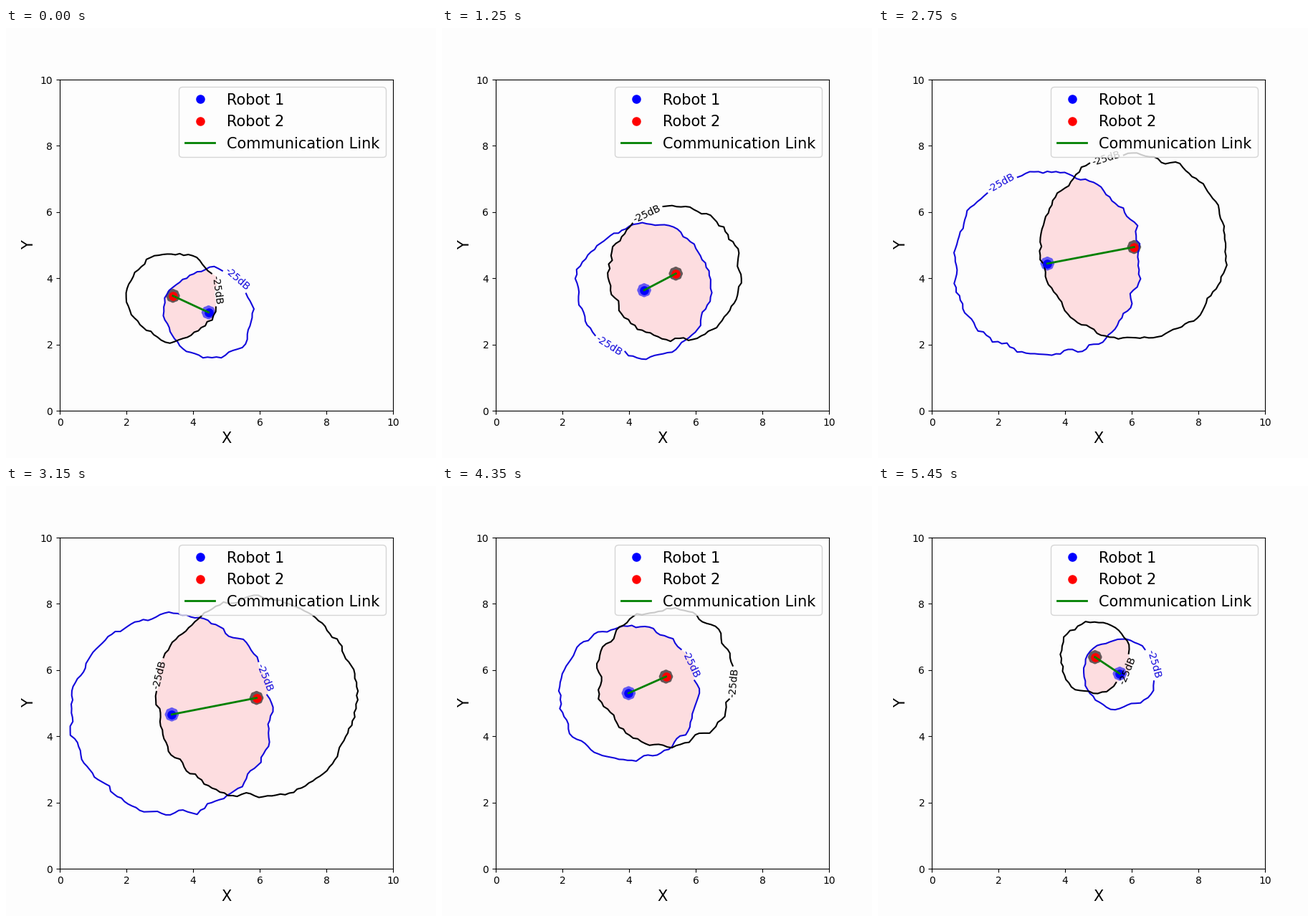
Recreate the animation shown at these times as a matplotlib script. Size 600 by 600 pixels, loop 5500 ms.

```python
import numpy as np
import matplotlib.pyplot as plt
from matplotlib.animation import FuncAnimation
from matplotlib.patches import Polygon
from matplotlib.path import Path

FRAMES, STEP = 110, 50
LAST = FRAMES - 1
PAPER = "#fdfdfd"
RING_COLORS = ("#1208dc", "black")
SPACING = 0.13      # distance between ring points
HALF_GAP = 0.51     # room for half a label


def positions(n):
    """Both robots climb steadily while they swing past each other."""
    s = n / LAST
    mid = (3.93 + 1.34 * s + 0.18 * np.sin(np.pi * s)
           + 0.57 * np.sin(2 * np.pi * s) + 0.027 * np.sin(4 * np.pi * s))
    apart = 0.51 + 2.1 * np.cos(0.0425 * (n - 57))
    y = 2.97 + 0.0268 * n
    return np.array([[mid - apart / 2, y], [mid + apart / 2, y + 0.5]])


def signal_range(n):
    """Grows at one rate, then shrinks faster."""
    return min(1.33 + 0.0265 * n, 1.07 + 0.0445 * (LAST - n))


def polar(center, radius, angle):
    return center + np.column_stack([radius * np.cos(angle), radius * np.sin(angle)])


def ring(center, radius, start, rng):
    """Closed noisy circle that begins at the angle start."""
    count = int(2 * np.pi * radius / SPACING)
    noise = rng.normal(size=count)
    noise = sum(np.roll(noise, k) for k in range(3)) / np.sqrt(3)
    angle = start + np.linspace(0, 2 * np.pi, count, endpoint=False)
    pts = polar(center, radius + 0.048 * (noise - noise.mean()), angle)
    return np.vstack([pts, pts[:1]])


def halo_shape(center):
    angle = np.linspace(0, 2 * np.pi, 100)
    return polar(center, 0.204 + 0.007 * np.cos(8 * angle), angle)


def blank_patch(color, **style):
    return ax.add_patch(Polygon(np.eye(3, 2), fc=color, ec="none", **style))


fig, ax = plt.subplots(figsize=(6, 6), dpi=100, facecolor=PAPER)
ax.set_facecolor(PAPER)
ax.set(xlim=(0, 10), ylim=(0, 10))
ax.set_xlabel("X", fontsize=15)
ax.set_ylabel("Y", fontsize=15)

overlap = blank_patch("#fddde0", zorder=0.5)
halos = [blank_patch(c, alpha=0.6, zorder=1.5) for c in ("blue", "black")]
dots = [ax.plot([], [], "o", color=c, ms=8, label=f"Robot {i + 1}")[0]
        for i, c in enumerate(("blue", "red"))]
link, = ax.plot([], [], color="green", lw=2, label="Communication Link")
lines = [ax.plot([], [], color=c, lw=1.5, zorder=1.8)[0] for c in RING_COLORS]
labels = [ax.text(0, 0, "-25dB", color=c, fontsize=10, ha="center", va="center",
                  rotation_mode="anchor") for c in RING_COLORS]
ax.legend(loc="upper right", fontsize=15, facecolor=PAPER)


def update(n):
    radius = signal_range(n)
    spots = positions(n)
    skip = round(HALF_GAP / SPACING)
    rings = []
    for i, spot in enumerate(spots):
        rng = np.random.default_rng(1000 * i + n)
        deg = rng.uniform(-180, 180)
        start = np.radians(deg)
        pts = ring(spot, radius, start, rng)
        rings.append(pts)

        lines[i].set_data(*pts[skip:-skip].T)
        labels[i].set_position(polar(spot, radius, start)[0])
        labels[i].set_rotation(deg % 180 - 90)
        halos[i].set_xy(halo_shape(spot))
        dots[i].set_data([spot[0]], [spot[1]])

    overlap.set_xy(rings[0])
    overlap.set_clip_path(Path(rings[1]), ax.transData)
    link.set_data(*spots.T)
    return [overlap, *halos, *lines, *dots, link, *labels]


anim = FuncAnimation(fig, update, frames=FRAMES, interval=STEP, repeat=True, repeat_delay=0)
plt.show()
```
